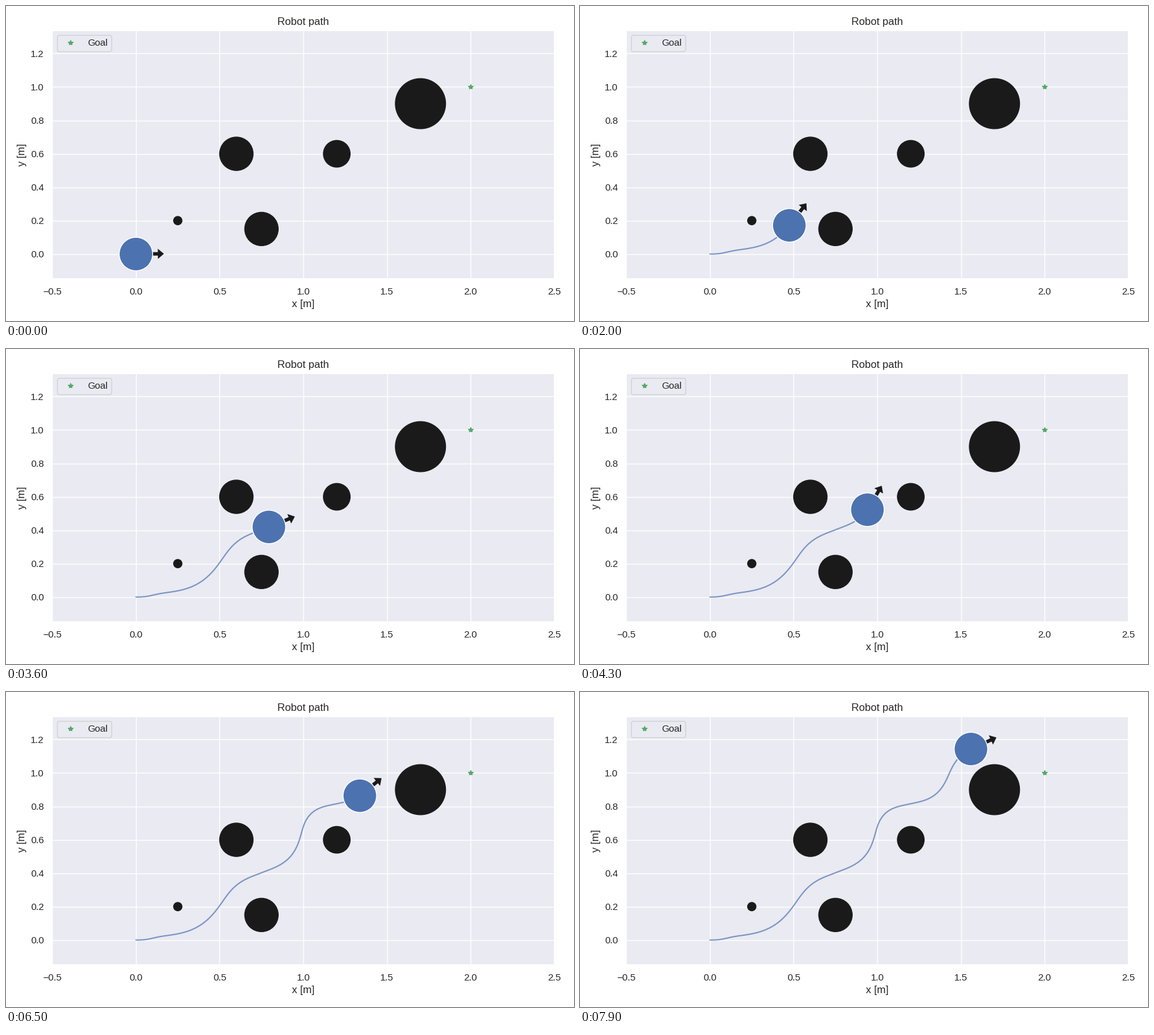
These frames come from a looping animation (900x500 px, 8000 ms). A matplotlib script:

```python
import matplotlib.pyplot as plt
import numpy as np
from matplotlib.animation import FuncAnimation
from matplotlib.patches import Circle, FancyArrow

W, H, DPI = 900, 500, 100
FRAMES, INTERVAL = 80, 100
SPEED = 0.02605         # metres per frame
RADIUS, REACH = 0.1, 0.167
BLUE, GREEN, BLACK, INK, PANEL = "#4C72B0", "#55A868", "#1A1A1A", "#262626", "#EAEAF2"

# Where the steering reverses: frame, heading in degrees
TURNS = [(0, 0), (4, 13), (7, 8), (23, 55), (33, 21), (35.5, 21),
         (48, 74.5), (58, 12), (60, 12), (71, 66), (81, 22)]

plt.rcParams.update({
    "font.family": "Liberation Sans", "font.size": 12,
    "text.color": INK, "axes.labelcolor": INK,
    "axes.titlesize": 12, "axes.labelsize": 12, "legend.fontsize": 11,
    "axes.facecolor": PANEL, "axes.edgecolor": "white", "axes.linewidth": 1.25,
    "axes.grid": True, "axes.axisbelow": True,
    "grid.color": "white", "grid.linewidth": 1, "grid.linestyle": "-",
    "lines.solid_capstyle": "round", "patch.linewidth": 1,
    "xtick.bottom": False, "ytick.left": False,
})
for tick in ("xtick", "ytick"):
    plt.rcParams.update({f"{tick}.color": INK, f"{tick}.labelsize": 11,
                         f"{tick}.major.size": 6})


def heading(t):
    """Heading in radians, eased from one turn to the next."""
    when, angle = np.array(TURNS).T
    i = np.searchsorted(when, t, side="right") - 1
    u = (t - when[i]) / (when[i + 1] - when[i])
    ease = (1 - np.cos(np.pi * u)) / 2
    return np.radians(angle[i] + (angle[i + 1] - angle[i]) * ease)


# Constant speed along the heading; each frame faces its next step
theta = heading(np.arange(FRAMES) + 0.5)
facing = np.column_stack([np.cos(theta), np.sin(theta)])
track = np.vstack([[0, 0], np.cumsum(SPEED * facing[:-1], axis=0)])

fig = plt.figure(figsize=(W / DPI, H / DPI), dpi=DPI, facecolor="white")
left, top, bottom, scale, zero = 73.3, 38.8, 433.4, 265.2, 393.7
ax = fig.add_axes([left / W, 1 - bottom / H, 3 * scale / W, (bottom - top) / H])
ax.set_xlim(-0.5, 2.5)
ax.set_ylim((zero - bottom) / scale, (zero - top) / scale)
ax.set_xticks(np.arange(-0.5, 2.6, 0.5))
ax.set_yticks(np.arange(7) * 0.2)
ax.set_title("Robot path")
ax.set_xlabel("x [m]")
ax.set_ylabel("y [m]")

for x, y, r in [(0.25, 0.2, 0.025), (0.6, 0.6, 0.1), (0.75, 0.15, 0.1),
                (1.2, 0.6, 0.08), (1.7, 0.9, 0.15)]:
    ax.add_patch(Circle((x, y), r, color=BLACK))

ax.plot([2], [1], "*", color=GREEN, label="Goal")
ax.legend(loc="upper left", facecolor=PANEL, edgecolor="0.8",
          framealpha=0.8, borderpad=0.38)

trail, = ax.plot([], [], color=BLUE, lw=1.5, alpha=0.7)
arrow = ax.add_patch(FancyArrow(0, 0, REACH, 0, width=0.021, head_width=0.061,
                                head_length=0.036, length_includes_head=True,
                                color=BLACK, lw=0, zorder=3))
robot = ax.add_patch(Circle((0, 0), RADIUS, facecolor=BLUE, edgecolor="white", zorder=4))


def update(k):
    (x, y), (dx, dy) = track[k], facing[k] * REACH
    trail.set_data(track[:k + 1, 0], track[:k + 1, 1])
    arrow.set_data(x=x, y=y, dx=dx, dy=dy)
    robot.center = x, y
    return trail, arrow, robot


anim = FuncAnimation(fig, update, frames=FRAMES, interval=INTERVAL,
                     init_func=lambda: update(0), repeat=True, repeat_delay=0)
plt.show()
```
